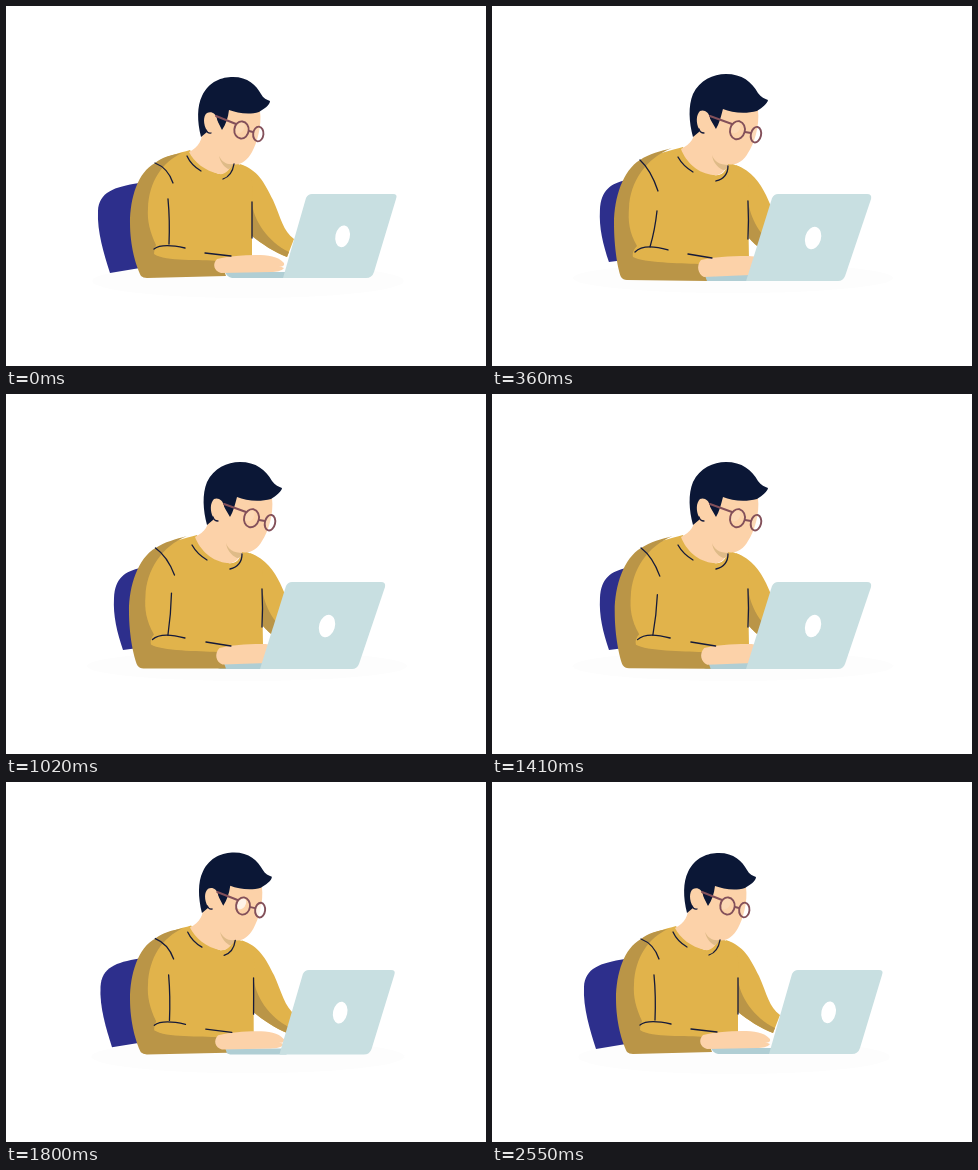
An HTML page for the animation above (2.7 s loop, 480 px wide and 360 px high).

```html
<!DOCTYPE html>
<html lang="en">
<head>
<meta charset="utf-8">
<title>Working at a laptop</title>
<style>
  html, body { margin: 0; width: 100%; height: 100%; overflow: hidden; background: #fff; }
  svg { display: block; width: 480px; height: 360px; }
</style>
</head>
<body>
<svg id="stage" viewBox="0 0 480 360" xmlns="http://www.w3.org/2000/svg"></svg>
<script>
const LOOP = 2700;
const YELLOW = '#e1b34b', SHADE = '#ba9547', SKIN = '#fcd2a9', NAVY = '#0b1736',
      FRAME = '#83505a', LID = '#c8dfe1';
const stage = document.getElementById('stage');
const parts = [];

// Each shape has a rest pose, a leaning pose and, for the arm, a pulled-back pose.
function add(style, rest, lean, pull) {
  const el = document.createElementNS(stage.namespaceURI, 'path');
  for (const key in style) el.setAttribute(key, style[key]);
  stage.append(el);
  const nums = s => s.match(/-?[\d.]+/g).map(Number);
  const base = nums(rest);
  const diff = s => s ? nums(s).map((v, i) => v - base[i]) : base.map(() => 0);
  parts.push({ el, rest, base, lean: diff(lean), pull: diff(pull) });
  return el;
}
const fill = color => ({ fill: color });
const line = (color, width) => ({
  fill: 'none', stroke: color, 'stroke-width': width,
  'stroke-linecap': 'round', 'stroke-linejoin': 'round'
});
const ink = line('#151a3a', 1.3);
const rim = line(FRAME, 1.9);

// Ellipse as a path so that it blends like the other shapes.
const oval = (x, y, rx, ry, tilt = 0) => {
  const c = Math.cos(tilt) * ry, s = Math.sin(tilt) * ry;
  const deg = tilt * 180 / Math.PI;
  const arc = (px, py) => `A${rx} ${ry} ${deg.toFixed(2)} 0 1 ${px.toFixed(2)} ${py.toFixed(2)}`;
  return `M${(x + s).toFixed(2)} ${(y - c).toFixed(2)}` + arc(x - s, y + c) + arc(x + s, y - c) + 'Z';
};

// Table and chair
add(fill('#fdfdfd'), oval(242, 275, 156, 17), oval(241, 272, 160, 15));
add(fill('#2d2f8c'),
  'M104 267C98 248 91 226 92 205C93 186 108 181 133 177L140 261Z',
  'M117 256C111 238 107 222 108 204C109 184 119 177 135 174L140 253Z');

// Far arm
add(fill(YELLOW),
  'M234 158C252 164 258 176 267 194C275 212 277 225 288 233L281 251C268 246 256 238 246 230L240 180Z',
  'M244 159C260 165 268 177 274 189C280 201 286 222 296 231L286 252C274 248 264 240 257 232L250 180Z');
add(fill(SHADE),
  'M246 196C247 214 262 236 283 246L281 251C268 246 256 238 246 230Z',
  'M256 195C259 212 266 230 290 245L286 252C274 248 264 240 257 232Z');

// Torso, neck and face
add(fill(YELLOW),
  'M184 144C174 147 158 150 149 158C136 168 133 192 133 215L138 258L215 258L246 251L246 196C248 180 246 166 238 160L226 156C222 166 218 168 213 168C201 164 191 156 184 144Z',
  'M191 141C180 144 162 148 152 155C136 166 133 190 133 215L138 260L218 260L257 251L256 195C259 180 256 166 248 161L236 156C234 168 228 170 222 169C209 164 198 156 191 141Z');
add(fill(SKIN),
  'M200 108L222 102L254 105C256 120 251 137 246 146C241 155 234 160 226 158C224 164 219 169 213 168C199 165 188 156 183 146C193 141 197 133 196 124Z',
  'M206 106L229 101L266 104C268 120 262 138 256 147C251 156 243 160 236 158C234 165 228 170 222 169C206 168 194 156 189 143C199 138 203 132 202 123Z');
add(fill('#dfbb88'),
  'M213 150C216 156 221 159 227 158C226 161 224 163 222 163C217 160 214 155 213 150Z',
  'M220 149C222 155 227 159 237 159C236 162 234 164 231 164C225 161 221 156 220 149Z');

// Hair and ear
add(fill(NAVY),
  'M195 131C191 115 191 100 196 90C203 75 216 71 227 71C242 71 250 79 255 88C257 92 261 94 264 95C264 99 258 103 253 106C243 109 231 107 223 104C222 112 220 118 216 124L210 112L201 126Z',
  'M201 131C197 116 196 100 201 88C208 74 221 68 234 68C250 68 260 76 266 87C269 91 273 93 276 94C276 97 270 102 265 105C254 108 240 107 231 103C229 111 227 118 224 123L217 111L207 126Z');
add(fill(SKIN),
  'M211 113C210 107 205 105 201 107C197 110 197 118 201 125C202 128 205 128 206 126L212 120Z',
  'M218 112C217 106 212 103 208 105C204 109 204 117 207 123C209 128 212 128 213 126L219 120Z');
add(ink, 'M200 124Q202 128 205 127', 'M207 123Q208 127 212 127');

// Glasses
const glints = [
  add(fill('#fff'), oval(234, 122, 4, 6, .6), oval(244, 122, 4, 6, .6)),
  add(fill('#fff'), oval(252, 128, 3.8, 6, .2), oval(263, 128.5, 3.8, 6, .25))
];
add(rim, oval(235.5, 124, 7.2, 8.6, .1), oval(245.5, 124.2, 7.6, 9.2, .25));
add(rim, oval(252.3, 128, 5.3, 7.4, .1), oval(264, 128.7, 5.2, 7.9, .22));
add(rim, 'M210 110L230 118', 'M218 110L240 118');
add(rim, 'M243 125L247 126', 'M253 126L259 127');

// Seams on the sweater
add(ink, 'M181 150Q185 159 195 165', 'M186 151Q191 160 201 166');
add(ink, 'M228 158Q226 170 217 173', 'M236 160Q236 172 224 175');
add(ink, 'M246 196Q246 214 246 232', 'M256 195Q257 215 256 233');

// Laptop base, near arm and hand
add(fill('#b0ced4'),
  'M219 266L284 266L284 272L226 272Q221 271 219 266Z',
  'M209 269L262 269L262 275L214 275Q210 274 209 269Z');
add(fill(SHADE),
  'M176 147C165 149 156 151 149 157C132 166 124 192 124 217C124 240 130 260 135 270Q137 272 141 272L220 270C218 264 216 259 213 255C194 253 160 256 148 248C148 245 149 242 150 239C144 226 141 215 142 202C143 176 156 156 176 147Z',
  'M182 142C171 145 160 148 151 154C133 164 124 192 124 217C124 242 130 264 134 272Q136 275 140 275L225 274C223 268 220 262 217 258C197 257 160 257 149 250C148 247 149 244 151 241C143 226 141 215 142 202C143 176 158 152 182 142Z',
  'M174 147C163 149 153 151 146 157C130 166 122 192 122 217C122 240 126 260 130 269Q132 271 136 271L210 271C208 265 206 259 203 255C184 253 152 256 140 249C140 245 142 241 144 238C138 226 136 215 137 202C138 176 152 156 174 147Z');
add(fill(SKIN),
  'M211 253C206 258 208 265 215 267L265 266C270 266 276 265 278 262L273 260C276 261 279 260 278 257C272 250 262 249 250 249C236 249 224 250 211 253Z',
  'M218 254C212 260 214 268 221 270L265 269C270 269 276 267 278 264L273 262C276 263 279 262 278 259C272 251 266 250 256 250C240 250 231 251 218 254Z',
  'M202 253C198 258 200 265 206 268L258 266C264 266 266 264 266 262L264 260C270 264 275 264 274 260C268 252 262 249 250 249C232 249 215 250 202 253Z');
add(ink, 'M149 157Q162 162 167 177', 'M151 154Q164 161 171 177', 'M146 157Q157 165 162 185');
add(ink, 'M162 193Q164 214 163 238', 'M166 193Q167 216 166 241', 'M161 205Q160 222 155 238');
add(ink, 'M148 243Q156 237 179 242', 'M150 245Q158 238 182 244', 'M141 244Q150 236 173 242');
add(ink, 'M199 247L225 250', 'M204 248L230 252', 'M191 247L215 250');

// Laptop lid
add(fill(LID),
  'M277 272L300 192Q302 188 306 188L387 188Q392 188 390 193L368 266Q366 272 360 272Z',
  'M254 275L280 192Q282 188 286 188L375 188Q380 188 379 193L353 270Q351 275 346 275Z');
add(fill('#fff'), oval(336.6, 230.3, 7.2, 11, .2), oval(321, 232, 8, 11.5, .28));

const span = (t, a, b) => Math.min(1, Math.max(0, (t - a) / (b - a)));
const smooth = u => u * u * (3 - 2 * u);
const move = (t, a, b) => smooth(span(t, a, b));

function leanAt(t) {
  const go = span(t, 0, 450), back = span(t, 1365, 1890);
  return smooth(1 - (1 - go) ** 2) - smooth(back ** 1.55);
}
function pullAt(t) {
  return move(t, 0, 150) - move(t, 600, 750) + move(t, 900, 1140)
    - move(t, 1350, 1500) + move(t, 1890, 2040) - move(t, 2400, 2550);
}

function draw(t) {
  const lean = leanAt(t), pull = pullAt(t);
  for (const part of parts) {
    let i = 0;
    part.el.setAttribute('d', part.rest.replace(/-?[\d.]+/g, () => {
      const v = part.base[i] + lean * part.lean[i] + pull * part.pull[i];
      i++;
      return +v.toFixed(2);
    }));
  }
  const shine = Math.min(.9, .15 + 1.2 * Math.sin(Math.PI * lean));
  glints.forEach(g => g.setAttribute('opacity', shine.toFixed(3)));
}

const start = performance.now();
function tick() {
  draw((performance.now() - start) % LOOP);
  requestAnimationFrame(tick);
}
draw(0);
requestAnimationFrame(tick);
</script>
</body>
</html>
```
